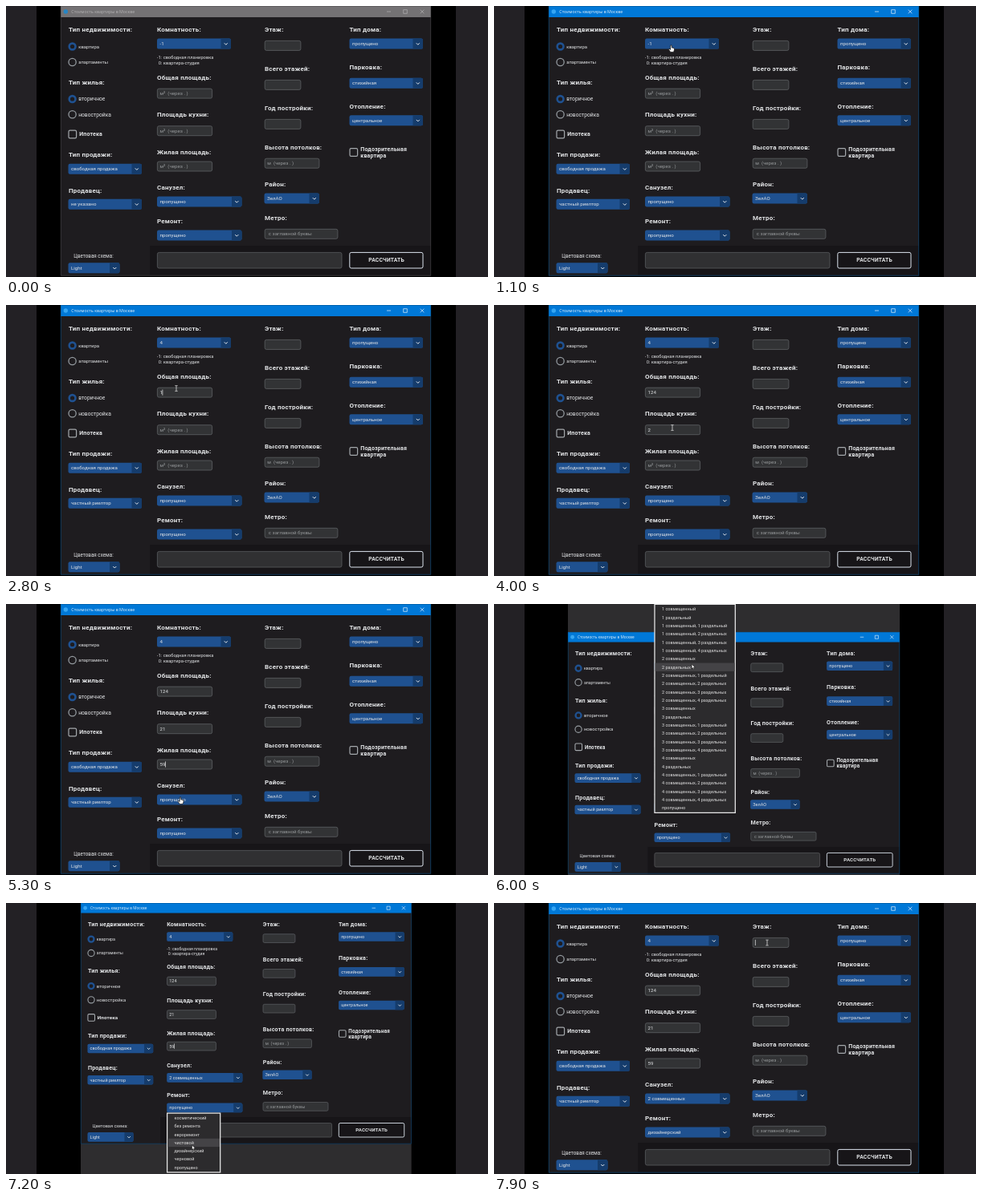
An HTML page with a canvas that plays this animation: 600 px wide and 338 px high, repeating every 8000 ms.

```html
<!DOCTYPE html>
<html lang="ru">
<head>
<meta charset="utf-8">
<style>
html, body { margin: 0; width: 100%; height: 100%; overflow: hidden; background: #000; }
canvas { display: block; width: 600px; height: 338px; }
</style>
</head>
<body>
<canvas id="stage"></canvas>
<script>
const W = 600, H = 338, LOOP = 8000;
const WIN = { x: 68, w: 461, h: 336.5 };
const ROW = 11.53;
const BLUE = '#1f5190', DARK_BLUE = '#153c6c', PANEL = '#1e1c1f';
const canvas = document.getElementById('stage');
const dpr = window.devicePixelRatio || 1;
canvas.width = W * dpr;
canvas.height = H * dpr;
const ctx = canvas.getContext('2d');

const headings = [
  ['Тип недвижимости:', 78, 29.5], ['Тип жилья:', 78, 95], ['Тип продажи:', 78, 185.5], ['Продавец:', 78, 230],
  ['Комнатность:', 188, 29.5], ['Общая площадь:', 188, 89], ['Площадь кухни:', 188, 135.5],
  ['Жилая площадь:', 188, 182], ['Санузел:', 188, 226.5], ['Ремонт:', 188, 268.5],
  ['Этаж:', 322, 29.5], ['Всего этажей:', 322, 78.5], ['Год постройки:', 322, 127],
  ['Высота потолков:', 322, 176], ['Район:', 322, 222.5], ['Метро:', 322, 264.5],
  ['Тип дома:', 427.5, 29.5], ['Парковка:', 427.5, 76.5], ['Отопление:', 427.5, 125]
];

const menus = {
  sale: { x: 77.5, y: 203.2, w: 91.5, value: 'свободная продажа' },
  seller: { x: 77.5, y: 247.2, w: 91.5, value: 'не указано' },
  theme: { x: 77.5, y: 326.8, w: 64, value: 'Light' },
  rooms: { x: 188, y: 47.1, w: 92, value: '-1' },
  bath: { x: 188, y: 244, w: 105.5, value: 'пропущено' },
  repair: { x: 188, y: 286, w: 105.5, value: 'пропущено' },
  district: { x: 321.5, y: 240, w: 68.5, value: 'ЗелАО' },
  house: { x: 427.5, y: 47.1, w: 91.5, value: 'пропущено' },
  parking: { x: 427.5, y: 96.2, w: 91.5, value: 'стихийная' },
  heating: { x: 427.5, y: 142.7, w: 91.5, value: 'центральное' }
};

const entries = {
  total: { x: 188, y: 109.1, w: 69, hint: 'м²  (через . )' },
  kitchen: { x: 188, y: 155.7, w: 69, hint: 'м²  (через . )' },
  living: { x: 188, y: 200, w: 69, hint: 'м²  (через . )' },
  floor: { x: 321.8, y: 49.4, w: 45.5, hint: '' },
  floors: { x: 321.8, y: 98.4, w: 45.5, hint: '' },
  year: { x: 321.8, y: 147.4, w: 45.5, hint: '' },
  ceiling: { x: 321.8, y: 196.2, w: 68.5, hint: 'м  (через . )' },
  metro: { x: 321.8, y: 284.3, w: 91.5, hint: ' с заглавной буквы' }
};

const choices = [
  { at: 1000, menu: 'seller', value: 'частный риелтор' },
  { at: 1900, menu: 'rooms', value: '4' },
  { at: 6500, menu: 'bath', value: '2 совмещенных' },
  { at: 7500, menu: 'repair', value: 'дизайнерский' }
];

const typing = [
  { field: 'total', text: '124', keys: [2800, 3000, 3200] },
  { field: 'kitchen', text: '21', keys: [4000, 4200] },
  { field: 'living', text: '59', keys: [4900, 5100] }
];

const focuses = [[2400, 'total'], [3700, 'kitchen'], [4700, 'living'], [7800, 'floor']];

function bathOptions() {
  const list = [];
  for (let n = 1; n <= 4; n++) {
    const joint = n + (n === 1 ? ' совмещенный' : ' совмещенных');
    list.push(joint, n + (n === 1 ? ' раздельный' : ' раздельных'));
    for (let k = 1; k <= 4; k++) list.push(`${joint}, ${k} ${k === 1 ? 'раздельный' : 'раздельных'}`);
  }
  return [...list, 'пропущено'];
}

const popups = [
  { from: 100, to: 1000, x: 78, y: 255, w: 74,
    items: ['агентство', 'застройщик', 'собственник', 'частный риелтор', 'не указано'] },
  { from: 1300, to: 1900, x: 188.5, y: 55, w: 40, items: ['-1', '0', '1', '2', '3', '4', '5', '6'] },
  { from: 6000, to: 6500, x: 188.5, y: -38.6, w: 112, items: bathOptions(), view: { x: 92, y: 35, s: .896 } },
  { from: 6900, to: 7500, x: 188.5, y: 293.5, w: 74, view: { x: 93, y: 0, s: .893 },
    items: ['косметический', 'без ремонта', 'евроремонт', 'чистовой', 'дизайнерский', 'черновой', 'пропущено'] }
];

// Pointer path: time, x, y.
const path = [
  [100, 118, 250], [700, 112, 297], [950, 112, 297], [1100, 220.5, 49], [1300, 220.5, 49],
  [1700, 205, 119], [1900, 205, 119], [2300, 212, 104], [3300, 212, 104], [3700, 222, 153],
  [4300, 222, 153], [4700, 222, 198], [5000, 222, 198], [5300, 217, 241], [5900, 217, 241],
  [6000, 240, 44.5], [6100, 240, 44.5], [6350, 238, 38], [6500, 238, 38], [6850, 220, 286],
  [6950, 220, 286], [7200, 223, 338], [7300, 223, 338], [7420, 222, 346], [7500, 222, 346],
  [7800, 340, 49.5], [8000, 340, 49.5]
];

function pointerAt(t) {
  const i = path.findIndex(p => p[0] > t);
  if (i < 1) return { x: path[0][1], y: path[0][2] };
  const [a, b] = [path[i - 1], path[i]];
  const u = (t - a[0]) / (b[0] - a[0]), e = u * u * (3 - 2 * u);
  return { x: a[1] + (b[1] - a[1]) * e, y: a[2] + (b[2] - a[2]) * e };
}

function text(str, x, y, size, { color = '#e2e4e6', weight = 400, gap = 0, font = 'Roboto', align = 'left' } = {}) {
  ctx.font = `${weight} ${size}px ${font}, sans-serif`;
  ctx.letterSpacing = gap + 'px';
  ctx.textAlign = align;
  ctx.fillStyle = color;
  ctx.fillText(str, x, y + size * .35);
  return ctx.measureText(str).width;
}

function box(x, y, w, h, r, fill, stroke, line = .8) {
  ctx.beginPath();
  ctx.roundRect(x, y, w, h, r);
  if (fill) { ctx.fillStyle = fill; ctx.fill(); }
  if (stroke) { ctx.strokeStyle = stroke; ctx.lineWidth = line; ctx.stroke(); }
}

function rect(x, y, w, h, fill) {
  ctx.fillStyle = fill;
  ctx.fillRect(x, y, w, h);
}

function polyline(points, color, width) {
  ctx.beginPath();
  points.forEach(([x, y]) => ctx.lineTo(x, y));
  ctx.strokeStyle = color;
  ctx.lineWidth = width;
  ctx.stroke();
}

function drawTitle(active) {
  const color = active ? '#e8f3fc' : '#b4b2b4';
  rect(WIN.x, 0, WIN.w, 14, active ? '#0078d7' : '#747274');
  ctx.beginPath();
  ctx.arc(74.3, 7, 2.7, 0, 7);
  ctx.fillStyle = active ? '#35a5f2' : '#2685c4';
  ctx.fill();
  text('Стоимость квартиры в Москве', 81.3, 7, 5.3, { color, font: 'Open Sans' });
  polyline([[474, 7], [479, 7]], color, .7);
  box(494.7, 4.7, 4.6, 4.6, 0, null, color, .7);
  polyline([[515.8, 4.7], [520.4, 9.3]], color, .7);
  polyline([[520.4, 4.7], [515.8, 9.3]], color, .7);
}

function drawRadio(y, label, size, on) {
  ctx.beginPath();
  ctx.arc(82.6, y, on ? 3.9 : 4.6, 0, 7);
  ctx.strokeStyle = on ? BLUE : '#949a9f';
  ctx.lineWidth = on ? 2.6 : 1.3;
  ctx.stroke();
  text(label, 90.2, y, size);
}

function drawCheck(x, y) {
  box(x, y - 4.8, 9.6, 9.6, 1.6, null, '#a4a8ac', 1.2);
}

function drawMenu({ x, y, w }, value) {
  box(x, y - 6.5, w, 13, 2.2, BLUE);
  box(x + w - 12.5, y - 6.5, 12.5, 13, [0, 2.2, 2.2, 0], DARK_BLUE);
  text(value, x + 3.5, y, 6.15);
  const c = x + w - 6.2;
  polyline([[c - 2, y - .8], [c, y + 1.2], [c + 2, y - .8]], '#e6eaee', 1);
}

function drawEntry({ x, y, w, hint }, value, caret) {
  box(x + .4, y - 6, w - .8, 12, 2, '#323335', '#5d6164');
  const shown = value || (caret ? '' : hint);
  const width = shown ? text(shown, x + 3.5, y, 6.15, { color: value ? '#dfe1e3' : '#96999b' }) : 0;
  if (caret) rect(x + 3.1 + width, y - 3.6, .7, 7.2, '#f0f0f0');
}

function drawWindow(t) {
  const active = t >= 1000;
  rect(WIN.x, 0, WIN.w, WIN.h, PANEL);
  rect(179, 299, 350, WIN.h - 299, '#171518');
  drawTitle(active);
  headings.forEach(([s, x, y]) => text(s, x, y, 8, { weight: 700, gap: .2 }));

  drawRadio(50.5, 'квартира', 5.95, true);
  drawRadio(70, 'апартаменты', 5.85, false);
  drawRadio(116, 'вторичное', 6.7, true);
  drawRadio(135.3, 'новостройка', 6.7, false);
  const bold = { weight: 700, gap: .15 };
  drawCheck(78, 160);
  text('Ипотека', 91.3, 160, 7, bold);
  drawCheck(428, 182.5);
  text('Подозрительная', 441.3, 178.7, 7.05, bold);
  text('квартира', 441.3, 186.3, 7.05, bold);
  text('-1: свободная планировка', 188, 64.2, 5.75);
  text('0: квартира-студия', 189.8, 71, 5.75);
  text('Цветовая схема:', 84.3, 311.5, 6.3);

  for (const key in menus) {
    const pick = choices.find(c => c.menu === key && t >= c.at);
    drawMenu(menus[key], pick ? pick.value : menus[key].value);
  }
  const focus = focuses.filter(f => t >= f[0]).pop();
  const blink = (t + 300) % 900 < 600;
  for (const key in entries) {
    const job = typing.find(j => j.field === key);
    const value = job ? job.text.slice(0, job.keys.filter(k => t >= k).length) : '';
    const focused = focus && focus[1] === key;
    drawEntry(entries[key], value, focused && blink);
  }

  box(188.4, 307.4, 229.6, 19.6, 2.2, '#303032', '#5a5c5f');
  box(427.8, 307.4, 91.2, 19.6, 2, null, '#dce4ee', 1);
  text('РАССЧИТАТЬ', 473.5, 316.9, 6.8, { ...bold, align: 'center' });
  box(WIN.x + .3, .3, WIN.w - .6, WIN.h - .6, 0, null, active ? '#0d5288' : '#4a494b', .6);
}

function drawPopup({ x, y, w, items }, pointer) {
  box(x, y, w, items.length * ROW + 1.8, 0, '#2c2b2d', '#e8e8e8', 1.4);
  const top = y + .9, hover = Math.floor((pointer.y - top) / ROW);
  items.forEach((item, i) => {
    if (i === hover) rect(x + .8, top + i * ROW, w - 1.6, ROW, '#444346');
    text(item, x + 10, top + (i + .5) * ROW, 6.2, { color: '#e0e0e0' });
  });
}

function shape(points) {
  ctx.beginPath();
  points.forEach(([x, y]) => ctx.lineTo(x, y));
  ctx.closePath();
  ctx.fillStyle = '#fff';
  ctx.strokeStyle = '#111';
  ctx.lineWidth = .7;
  ctx.fill();
  ctx.stroke();
}

const over = (group, half, p) => Object.values(group).some(
  f => p.x >= f.x && p.x <= f.x + f.w && Math.abs(p.y - f.y) <= half);

function drawPointer(p, popup) {
  ctx.save();
  ctx.translate(p.x, p.y);
  if (!popup && over(entries, 6.5, p)) {
    polyline([[-1.7, -3.4], [1.7, -3.4]], '#ddd', .7);
    polyline([[0, -3.4], [0, 3.4]], '#ddd', .8);
    polyline([[-1.7, 3.4], [1.7, 3.4]], '#ddd', .7);
  } else if (!popup && over(menus, 6.5, p)) {
    shape([[-.7, 0], [.7, 0], [.9, 3], [3.9, 3.6], [4, 6], [3, 8.4], [-.8, 8.4], [-3, 5.3], [-2.4, 4.4], [-.8, 5.4]]);
  } else {
    shape([[0, 0], [0, 6.6], [1.5, 5.3], [2.6, 7.7], [3.6, 7.2], [2.6, 4.9], [4.6, 4.8]]);
  }
  ctx.restore();
}

function draw(t) {
  ctx.setTransform(dpr, 0, 0, dpr, 0, 0);
  rect(0, 0, W, H, '#232125');
  rect(38, 0, 522, H, '#000');
  const popup = popups.find(p => t >= p.from && t < p.to);
  const view = popup && popup.view;
  if (view) {
    rect(view.x, 0, WIN.w * view.s, H, '#2e2d2f');
    ctx.translate(view.x, view.y);
    ctx.scale(view.s, view.s);
    ctx.translate(-WIN.x, 0);
  }
  drawWindow(t);
  const pointer = pointerAt(t);
  if (popup) drawPopup(popup, pointer);
  if (t >= 100) drawPointer(pointer, popup);
}

function tick() {
  draw(performance.now() % LOOP);
  requestAnimationFrame(tick);
}
tick();
</script>
</body>
</html>
```
